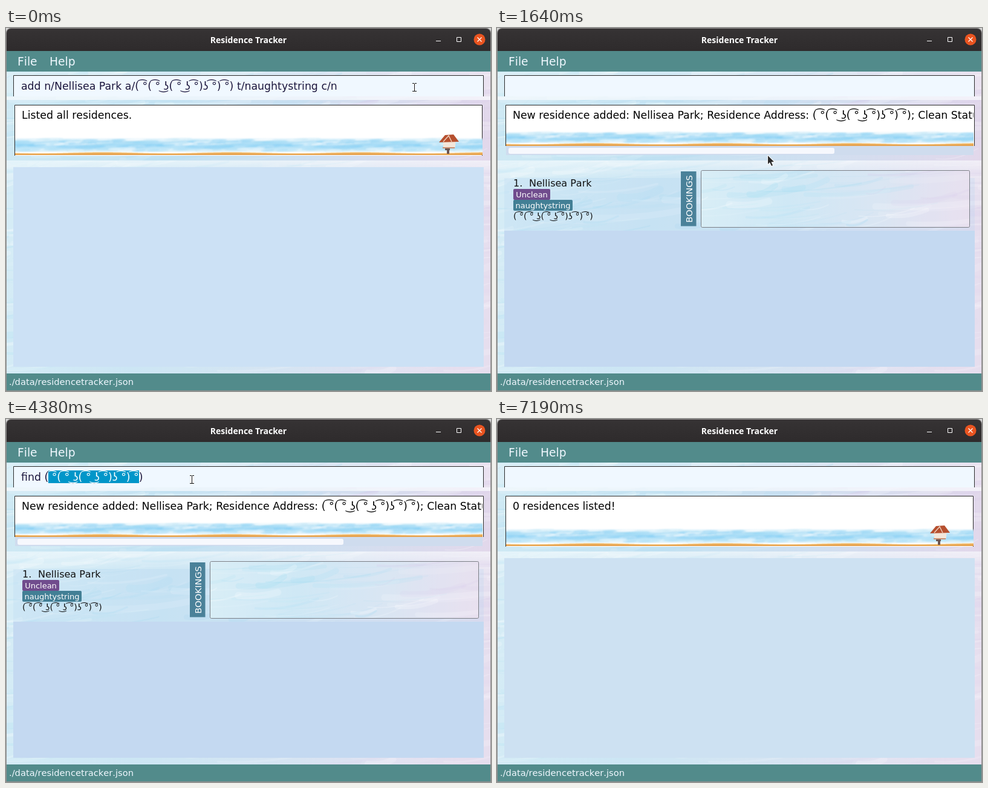
An HTML page with a canvas for the animation above (7400 ms loop, 802 by 600 pixels).

```html
<!DOCTYPE html>
<html lang="en">
<head>
<meta charset="utf-8">
<title>Residence Tracker</title>
<style>
html, body { margin: 0; width: 100%; height: 100%; overflow: hidden; }
canvas { display: block; }
</style>
</head>
<body>
<canvas id="stage" width="802" height="600"></canvas>
<script>
const W = 802, H = 600, LOOP = 7400;
const BLINK = 520, STEP = 77;
const FIELD_X = 25, FIELD_SIZE = 17.33;
const TEAL = '#528b8b', PALE = '#f0f8ff', INK = '#2b2b2b';
const WASH = ['#cfe9f4', '#c3e2f2', '#d0dff0', '#e2d8eb'];

const ctx = document.getElementById('stage').getContext('2d');
const FACE = '( \u0361°( \u0361° \u035C\u0296( \u0361° \u035C\u0296 \u0361°)\u0296 \u0361°) \u0361°)';
const NAME = 'Nellisea Park';
const ADD = `add n/${NAME} a/${FACE} t/naughtystring c/n`;
const FIND = `find ${FACE}`;
const ADDED = `New residence added: ${NAME}; Residence Address: ${FACE}; Clean Status: Unclean`;

function random(seed) {
  return () => (seed = (seed * 16807) % 2147483647) / 2147483647;
}

function rect(c, x, y, w, h, color, r = 0) {
  c.fillStyle = color;
  c.beginPath();
  c.roundRect(x, y, w, h, r);
  c.fill();
}

function outline(c, x, y, w, h, color, r = 0) {
  c.strokeStyle = color;
  c.lineWidth = 1;
  c.beginPath();
  c.roundRect(x + 0.5, y + 0.5, w - 1, h - 1, r);
  c.stroke();
}

// Only strings with combining marks are kerned.
function setFont(c, str, size) {
  c.font = `${size}px "DejaVu Sans", sans-serif`;
  c.fontKerning = str.includes(FACE) ? 'normal' : 'none';
}

function text(c, str, x, y, size, color, align = 'left') {
  setFont(c, str, size);
  c.textAlign = align;
  c.fillStyle = color;
  c.fillText(str, x, y);
}

function clipped(c, x, y, w, h, draw) {
  c.save();
  c.beginPath();
  c.rect(x, y, w, h);
  c.clip();
  draw();
  c.restore();
}

function gradient(c, x0, y0, x1, y1, colors) {
  const g = c.createLinearGradient(x0, y0, x1, y1);
  colors.forEach((color, i) => g.addColorStop(i / (colors.length - 1), color));
  return g;
}

// Watercolour: a soft gradient, whitened by "light", under slanted strokes.
function wash(c, x, y, w, h, seed, light) {
  const rnd = random(seed * 7919);
  clipped(c, x, y, w, h, () => {
    rect(c, x, y, w, h, gradient(c, x, y, x + w, y + h / 2, WASH));
    rect(c, x, y, w, h, `rgba(255,255,255,${light})`);
    c.lineCap = 'round';
    for (let i = 0; i < w * h / 700; i++) {
      const u = rnd() * 1.2 - 0.2, px = x + u * w, py = y + rnd() * h;
      const len = 30 + rnd() * 150;
      const tint = rnd() < 0.5 ? '255,255,255' : u > 0.6 ? '212,200,230' : '155,215,238';
      c.strokeStyle = `rgba(${tint},${0.06 + rnd() * 0.16})`;
      c.lineWidth = 1 + rnd() * rnd() * 14;
      c.beginPath();
      c.moveTo(px, py);
      c.quadraticCurveTo(px + len / 2, py + 4, px + len, py - 4 - rnd() * 14);
      c.stroke();
    }
  });
}

// The seascape repeats every 213 px.
function drawSea(c, top, bottom) {
  const rnd = random(4242), tile = 213, sand = bottom - 5, h = sand - top;
  clipped(c, 15, top - 4, 773, bottom - top + 4, () => {
    rect(c, 15, top, 773, h, gradient(c, 0, top, 0, sand,
      ['rgba(190,230,248,0)', '#c3e7f8', '#a6dcf7', '#c0e7f9', '#eef8fc']));
    c.filter = 'blur(1px)';
    for (let i = 0; i < 60; i++) {
      const px = rnd() * tile, py = top + h * (0.1 + rnd() * 0.8), len = 5 + rnd() * 22;
      c.globalAlpha = 0.2 + rnd() * 0.3;
      c.fillStyle = ['#7fcdf5', '#ffffff', '#a3dcf5'][i % 3];
      for (let x = px - tile; x < W + tile; x += tile) {
        c.beginPath();
        c.ellipse(x, py, len, 0.8 + len / 14, -0.04, 0, 7);
        c.fill();
      }
    }
    c.filter = 'none';
    c.globalAlpha = 1;
    for (let x = 15; x < 788; x++) {
      const crest = sand + 1 + Math.sin(x / tile * 2 * Math.PI);
      rect(c, x, crest, 1, bottom - crest, gradient(c, 0, crest, 0, bottom, ['#f8dcab', '#e9a54c', '#e3a052']));
    }
  });
}

function drawHut(c) {
  c.save();
  c.translate(732, 188);
  rect(c, -9, 0, 20, 9, '#f3e6da');
  c.fillStyle = '#b6502f';
  c.beginPath();
  c.moveTo(-16, 1); c.lineTo(-6, -11); c.lineTo(8, -12); c.lineTo(17, 0);
  c.fill();
  c.strokeStyle = '#f0d6c4';
  c.beginPath();
  c.moveTo(-9, 0); c.lineTo(0, -10); c.lineTo(5, 0);
  c.stroke();
  rect(c, -10, 9, 20, 2, '#c98f72');
  rect(c, -6, 11, 8, 3, '#6d5450');
  rect(c, -3, 14, 4, 6, '#6d5450');
  c.restore();
}

function drawChrome(c) {
  rect(c, 0, 0, W, H, '#d6d6d6');
  rect(c, 0, 0, W, H, '#8f8d8c', [8, 8, 0, 0]);
  rect(c, 1, 1, W - 2, 37, gradient(c, 0, 1, 0, 38, ['#363334', '#2e2b2c']), [7, 7, 0, 0]);
  c.font = '700 14px "Open Sans", sans-serif';
  c.textAlign = 'center';
  c.fillStyle = '#ffffff';
  c.fillText('Residence Tracker', 401, 25);
  rect(c, 711, 21, 8, 1, '#ffffff');
  outline(c, 745, 15, 8, 8, '#ffffff');
  rect(c, 773.5, 9.5, 19, 19, '#e95420', 9.5);
  c.lineWidth = 1.3;
  c.beginPath();
  for (const s of [-3.5, 3.5]) {
    c.moveTo(783 - s, 15.5);
    c.lineTo(783 + s, 22.5);
  }
  c.stroke();
  rect(c, 1, 38, 800, 34, TEAL);
  text(c, 'File', 19, 62, 18.67, PALE);
  text(c, 'Help', 72, 62, 18.67, PALE);
}

function drawBox(c, x, y, w, h, fill) {
  clipped(c, x, y, w, h, () => {
    rect(c, x, y, w, h, fill);
    outline(c, x, y, w, h + 2, INK);
  });
}

function drawTag(c, str, y, w, color) {
  rect(c, 27, y, w, 18, color, 2);
  text(c, str, 27 + w / 2, y + 14, 13, '#ffffff', 'center');
}

function drawCard(c) {
  rect(c, 12, 248, 778, 87, 'rgba(180,211,238,.25)');
  text(c, '1.', 27, 262, 16, '#111111');
  text(c, NAME, 53, 262, 16, '#111111');
  drawTag(c, 'Unclean', 266, 61, '#704c8d');
  drawTag(c, 'naughtystring', 284, 98, '#427f95');
  text(c, FACE, 27, 316, 14, '#111111');

  rect(c, 304, 237, 25.5, 90.5, '#4a8199');
  c.save();
  c.translate(323, 282.5);
  c.rotate(-Math.PI / 2);
  text(c, 'BOOKINGS', 0, 0, 14.67, '#ffffff', 'center');
  c.restore();

  wash(c, 337, 235, 445, 95, 57, 0.2);
  outline(c, 337, 235, 445, 95, '#7b7f86', 2);
}

function makeScene(message, panel, listed) {
  const canvas = document.createElement('canvas');
  canvas.width = W;
  canvas.height = H;
  const c = canvas.getContext('2d');
  drawChrome(c);
  wash(c, 1, 72, 800, 47, 5, 0.25);
  rect(c, 1, 113, 800, 6, 'rgba(250,252,255,.6)');
  wash(c, 1, 119, 800, 100, 8, 0);
  wash(c, 1, 219, 800, 352, 23, 0.15);
  rect(c, 1, 219, 800, 30, gradient(c, 0, 219, 0, 249, ['rgba(255,255,255,.5)', 'rgba(255,255,255,0)']));

  drawBox(c, 12, 78, 778, 35, PALE);
  drawBox(c, 14, 127, listed ? 776 : 774, listed ? 68 : 84, '#ffffff');
  if (listed) {
    drawSea(c, 171, 195);
    rect(c, 15, 195, 773, 15, '#cfdcee');
    rect(c, 19, 198, 539, 10, '#f6f8fd', 3);
    drawCard(c);
  } else {
    drawSea(c, 181, 210);
    drawHut(c);
  }
  clipped(c, 15, 128, 773, 60, () => text(c, message, 26, 150, FIELD_SIZE, '#000000'));

  const top = listed ? 335 : 230;
  rect(c, 12, top, 778, 560 - top, panel);
  rect(c, 1, 571, 800, 28, TEAL);
  text(c, './data/residencetracker.json', 5, 590, 14.67, PALE);
  return canvas;
}

// Each phase sets the scene and the field, and restarts the caret blink.
const start = makeScene('Listed all residences.', '#cce1f5', false);
const added = makeScene(ADDED, '#c4d9f1', true);
const none = makeScene('0 residences listed!', '#cde1f2', false);
const phases = [
  { at: 70 - 2 * BLINK, scene: start, value: ADD },
  { at: 630, scene: added, value: '' },
  { at: 3120, scene: added, value: FIND },
  { at: 3850, scene: added, value: FIND, selected: true },
  { at: 4690, scene: added, value: FIND },
  { at: 5620, scene: none, value: '' }
];

// Pointer trips: start time, end time, destination.
const trips = [
  [1260, 1960, 216, 326],
  [2040, 2260, 118, 306],
  [2420, 2740, 180, 99],
  [3290, 4010, 150, 100],
  [4110, 4340, 307, 100],
  [4690, 5010, 494, 90],
  [6630, 6800, 759, 266],
  [7030, 7190, 830, 640]
];

function pointerAt(t) {
  let x = 675, y = 98;
  for (const [from, to, tx, ty] of trips) {
    if (t < from) break;
    const done = (Math.floor((t - from) / STEP) + 1) * STEP;
    const p = Math.min(1, done / (to - from + STEP));
    x += (tx - x) * p;
    y += (ty - y) * p;
  }
  return [Math.round(x), Math.round(y)];
}

function drawBeam() {
  rect(ctx, -1, -6, 3, 13, 'rgba(255,255,255,.8)');
  rect(ctx, 0, -6, 1, 13, '#111111');
  for (const y of [-7, 6]) {
    rect(ctx, -3, y, 3, 1, '#111111');
    rect(ctx, 1, y, 3, 1, '#111111');
  }
}

const arrow = new Path2D('M0 0V14L3 11L6 17L8 16L5.5 10.5L10 10Z');

function drawArrow() {
  ctx.lineJoin = 'round';
  ctx.lineWidth = 1.8;
  ctx.strokeStyle = '#ffffff';
  ctx.stroke(arrow);
  ctx.fillStyle = INK;
  ctx.fill(arrow);
}

function drawPointer(t) {
  const [x, y] = pointerAt(t);
  ctx.save();
  ctx.translate(x, y);
  if (y > 78 && y < 113) drawBeam();
  else drawArrow();
  ctx.restore();
}

function drawField({ value, selected, at }, t) {
  const write = color => text(ctx, value, FIELD_X, 102, FIELD_SIZE, color);
  write('#1c163c');
  const end = FIELD_X + ctx.measureText(value).width;
  if (selected) {
    const x = Math.round(FIELD_X + ctx.measureText('find (').width);
    const w = Math.round(end - ctx.measureText(')').width) - x;
    rect(ctx, x, 85, w, 21, '#0096c9');
    clipped(ctx, x, 85, w, 21, () => write('#ffffff'));
  } else if (Math.floor((t - at) / BLINK) % 2 === 0) {
    rect(ctx, Math.floor(end), 85, 1, 21, '#55586c');
  }
}

function draw(t) {
  const phase = phases.filter(p => t >= p.at).pop();
  ctx.drawImage(phase.scene, 0, 0);
  drawField(phase, t);
  drawPointer(t);
}

const begin = performance.now();
function tick() {
  draw((performance.now() - begin) % LOOP);
  requestAnimationFrame(tick);
}
tick();
</script>
</body>
</html>
```
